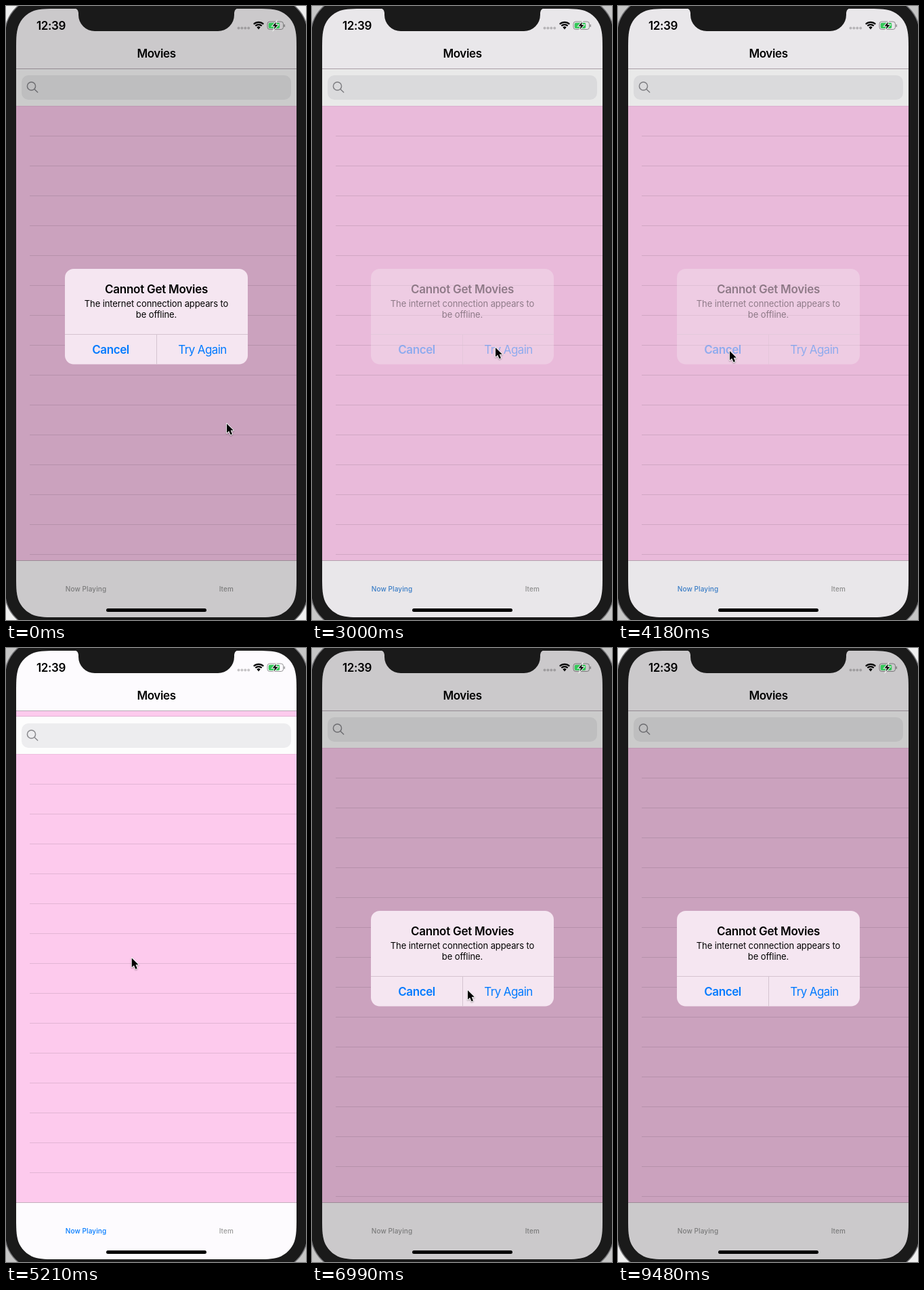
Recreate the animation shown at these times as an HTML page with a canvas. Size 443x904 px, loop 9580 ms.

```html
<!DOCTYPE html>
<html lang="en">
<head>
<meta charset="utf-8">
<title>Movies offline alert</title>
<style>
html, body { margin: 0; width: 100%; height: 100%; overflow: hidden; background: #ececec; }
canvas { display: block; width: 443px; height: 904px; }
</style>
</head>
<body>
<canvas id="stage" width="443" height="904"></canvas>
<script>
const ctx = document.getElementById('stage').getContext('2d');
const LOOP = 9580;
const FONT = 'Inter, "Liberation Sans", sans-serif';
const BLUE = [0, 122, 255], GREY = [153, 153, 153];
const BODY = '#1a1a1a', BAR = '#fdfbfe', PINK = '#fdcaed';

const SHOW = [-9, 22, 40, 57];
const HIDE = [-99, 20, 28, 55];
const GRAB = 34.2, RELEASE = 40;
const CURSOR_STOPS = [
  [0, 326, 615], [2, 356, 893], [7, 293, 488], [9, 294, 513], [12, 280, 508],
  [16, 271, 503], [23, 271, 503], [26, 165, 508], [31, 165, 508],
  [GRAB, 185, 438], [RELEASE, 199, 794], [47, 230, 504], [50, 184, 520],
  [53, 280, 512], [58, 280, 512], [62, 322, 930]
];

const stepAt = t => t < 1650
  ? Math.min(10, Math.floor((t + 11) / 147.4))
  : Math.min(64, 11 + Math.floor((t - 1650) / 147.5));

function cursorAt(step) {
  const next = CURSOR_STOPS.findIndex(stop => stop[0] >= step);
  if (next < 0) return CURSOR_STOPS.at(-1).slice(1);
  const b = CURSOR_STOPS[next], a = CURSOR_STOPS[Math.max(0, next - 1)];
  const k = (step - a[0]) / (b[0] - a[0] || 1);
  const eased = k * k * (3 - 2 * k);
  return [1, 2].map(i => a[i] + (b[i] - a[i]) * eased);
}

// The alert shrinks into place but leaves by fading only.
function alertAt(step) {
  const latest = list => list.findLast(at => at <= step);
  const shown = latest(SHOW), hidden = latest(HIDE);
  if (hidden > shown) return { p: Math.max(0, .4 - .4 * (step - hidden)), scale: 1 };
  const p = 1 - .55 * .14 ** (step - shown);
  return { p, scale: 1.2 - .2 * p };
}

// The list follows the cursor at half speed, then springs back.
function pullAt(step) {
  if (step < GRAB) return 0;
  const dragged = (cursorAt(Math.min(step, RELEASE))[1] - 438) * .503;
  return Math.round(dragged * .4 ** Math.max(0, step - RELEASE));
}

function rect(x, y, w, h, color) {
  ctx.fillStyle = color;
  ctx.fillRect(x, y, w, h);
}

function rounded(x, y, w, h, r, color) {
  ctx.beginPath();
  ctx.roundRect(x, y, w, h, r);
  if (color) {
    ctx.fillStyle = color;
    ctx.fill();
  }
}

// Rectangle whose corners ease gradually into the sides.
function smoothRect(x, y, w, h, r) {
  const corner = (cx, cy, ax, ay, bx, by) => {
    const at = (a, b) => [cx + (ax * a + bx * b) * r, cy + (ay * a + by * b) * r];
    ctx.lineTo(...at(1.528, 0));
    ctx.bezierCurveTo(...at(1.088, 0), ...at(.868, 0), ...at(.631, .075));
    ctx.bezierCurveTo(...at(.373, .169), ...at(.169, .373), ...at(.075, .631));
    ctx.bezierCurveTo(...at(0, .868), ...at(0, 1.088), ...at(0, 1.528));
  };
  ctx.beginPath();
  corner(x, y, 0, 1, 1, 0);
  corner(x + w, y, -1, 0, 0, 1);
  corner(x + w, y + h, 0, -1, -1, 0);
  corner(x, y + h, 1, 0, 0, -1);
  ctx.closePath();
}

function text(str, x, y, size, weight, color, tracking) {
  ctx.font = `${weight} ${size}px ${FONT}`;
  ctx.letterSpacing = tracking + 'px';
  ctx.textAlign = 'center';
  ctx.fillStyle = color;
  ctx.fillText(str, x, y);
}

function polygon(points) {
  ctx.beginPath();
  points.forEach(([x, y]) => ctx.lineTo(x, y));
  ctx.closePath();
}

function drawSpinner(pull) {
  const ticks = Math.round(12 * Math.min(1, Math.max(0, (pull - 25) / 90)));
  ctx.save();
  ctx.translate(222, 122);
  ctx.rotate(-.15);
  ctx.strokeStyle = 'rgba(45,28,42,.68)';
  ctx.lineWidth = 2.2;
  ctx.lineCap = 'round';
  for (let i = 0; i < ticks; i++) {
    ctx.beginPath();
    ctx.moveTo(0, -8);
    ctx.lineTo(0, -14.4);
    ctx.stroke();
    ctx.rotate(Math.PI / 6);
  }
  ctx.restore();
}

function drawList(pull) {
  ctx.save();
  ctx.beginPath();
  ctx.rect(15, 93, 414, 723);
  ctx.clip();
  rect(15, 93, 414, 723, PINK);
  drawSpinner(pull);
  ctx.translate(0, pull);
  rect(15, 91, 414, 1, 'rgba(0,0,0,.1)');
  rect(15, 92, 414, 55, '#fdfdfd');
  rect(15, 147, 414, 1, 'rgba(0,0,0,.06)');
  rounded(23, 102, 398, 36, 10, '#ededef');
  ctx.strokeStyle = '#88888c';
  ctx.lineWidth = 1.5;
  ctx.lineCap = 'round';
  ctx.beginPath();
  ctx.arc(37.5, 118, 6.1, 0, 7);
  ctx.moveTo(42, 122.5);
  ctx.lineTo(46.7, 127);
  ctx.stroke();
  for (let y = 191; y < 816; y += 44) rect(35, y, 394, 1, 'rgba(0,0,0,.1)');
  ctx.restore();
}

function drawStatus() {
  text('12:39', 66.5, 35, 17, 600, '#000', -.4);
  for (let i = 0; i < 4; i++) rounded(341.5 + i * 4.9, 30.5, 4, 4, 2, 'rgba(0,0,0,.22)');

  const wave = r => ctx.arc(373, 34, r, -Math.PI * .75, -Math.PI * .25);
  ctx.strokeStyle = ctx.fillStyle = '#000';
  ctx.lineWidth = 2.2;
  ctx.lineCap = 'butt';
  for (const r of [10.2, 6.6]) {
    ctx.beginPath();
    wave(r);
    ctx.stroke();
  }
  ctx.beginPath();
  ctx.moveTo(373, 34.4);
  wave(3.8);
  ctx.fill();

  rounded(386, 23, 23.5, 11.5, 3.4);
  ctx.strokeStyle = 'rgba(0,0,0,.4)';
  ctx.lineWidth = 1;
  ctx.stroke();
  rounded(410.5, 27, 1.5, 4, 1, 'rgba(0,0,0,.4)');
  rounded(387.7, 24.7, 16.5, 8.2, 2, '#34c759');
  polygon([[399, 23.5], [393.5, 29.5], [397, 29.5], [395.5, 34.5], [401.5, 28], [398, 28]]);
  ctx.strokeStyle = '#f2f2f2';
  ctx.lineWidth = 2;
  ctx.stroke();
  ctx.fillStyle = '#000';
  ctx.fill();
}

function drawBars(p) {
  rect(15, 4, 414, 88, BAR);
  rect(15, 92, 414, 1, '#b8acb6');
  text('Movies', 222, 76, 17, 600, '#000', -.4);
  rect(15, 817, 414, 83, BAR);
  rect(15, 816, 414, 1, '#c4aebd');
  const tint = BLUE.map((v, i) => Math.round(v + (GREY[i] - v) * p));
  text('Now Playing', 118, 862, 10, 500, `rgb(${tint})`, .1);
  text('Item', 325.3, 862, 10, 500, '#999', .1);
}

function drawAlert({ p, scale }) {
  ctx.save();
  ctx.globalAlpha = p;
  ctx.translate(222, 457);
  ctx.scale(scale, scale);
  ctx.translate(-222, -457);
  rounded(87, 387, 270, 140.5, 13, '#f5e6f1');
  rect(87, 483, 270, 1, '#d5c4d0');
  rect(222, 484, 1, 43.5, '#d5c4d0');
  text('Cannot Get Movies', 222, 423, 17, 600, '#000', -.25);
  text('The internet connection appears to', 222, 443, 13, 400, '#000', -.1);
  text('be offline.', 222, 459, 13, 400, '#000', -.1);
  text('Cancel', 154.5, 511.7, 17, 600, '#007aff', -.4);
  text('Try Again', 290, 511.7, 17, 400, '#007aff', -.6);
  ctx.restore();
}

function drawNotch() {
  ctx.beginPath();
  ctx.moveTo(98, 3);
  ctx.arcTo(107, 3.5, 107, 37, 7);
  ctx.arcTo(107, 37, 222, 37, 24);
  ctx.arcTo(337, 37, 337, 3.5, 24);
  ctx.arcTo(337, 3.5, 346, 3, 7);
  ctx.lineTo(346, 3);
  ctx.fillStyle = BODY;
  ctx.fill();
}

function drawCursor([x, y]) {
  ctx.save();
  ctx.translate(x, y);
  polygon([[0, 0], [0, 13.5], [3.2, 10.7], [5.6, 16.2], [8, 15.2], [5.7, 9.8], [9.8, 9.8]]);
  ctx.shadowColor = 'rgba(0,0,0,.35)';
  ctx.shadowBlur = 2;
  ctx.shadowOffsetY = 1;
  ctx.lineWidth = 1.8;
  ctx.lineJoin = 'round';
  ctx.strokeStyle = '#fff';
  ctx.stroke();
  ctx.shadowColor = 'transparent';
  ctx.fillStyle = '#000';
  ctx.fill();
  ctx.restore();
}

function draw(t) {
  const step = stepAt(t);
  const alert = alertAt(step);
  const windowActive = step >= 9 && step < 64;

  rect(0, 0, 443, 904, windowActive ? '#c6c6c6' : '#f0f0f0');
  smoothRect(-3, -14, 450, 932, 59);
  ctx.fillStyle = BODY;
  ctx.fill();
  ctx.strokeStyle = '#77777a';
  ctx.lineWidth = 1.5;
  ctx.stroke();

  ctx.save();
  smoothRect(15, 4, 414, 896, 41.5);
  ctx.clip();
  drawList(pullAt(step));
  drawBars(alert.p);
  rect(15, 4, 414, 896, `rgba(0,0,0,${.2 * alert.p})`);
  drawStatus();
  if (alert.p > 0) drawAlert(alert);
  rounded(148, 887, 148, 5, 2.5, '#000');
  ctx.restore();

  drawNotch();
  drawCursor(cursorAt(step));
}

const start = performance.now();
function tick() {
  draw((performance.now() - start) % LOOP);
  requestAnimationFrame(tick);
}
tick();
</script>
</body>
</html>
```
